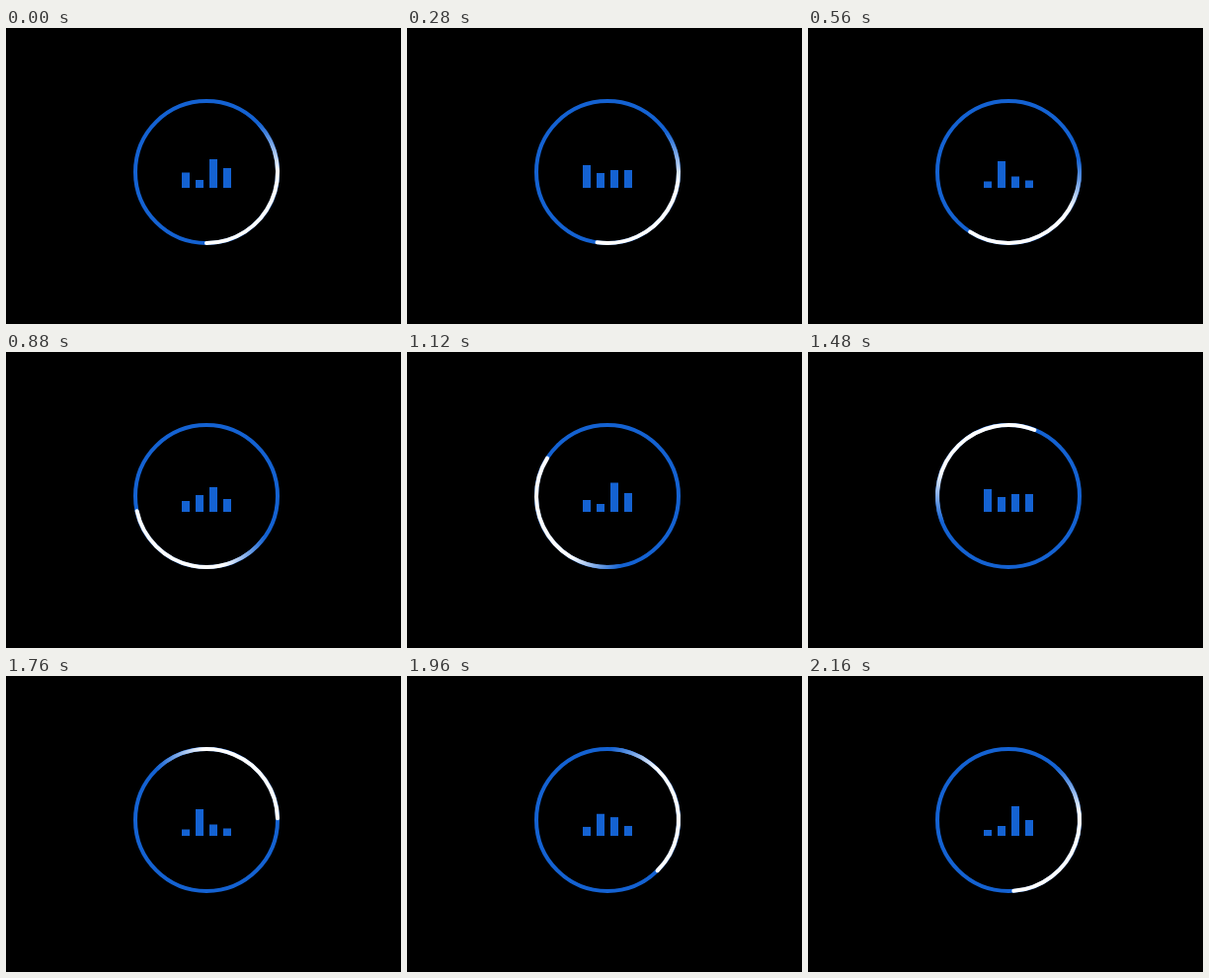
An HTML page for the animation above (2.2 s loop, 400 by 300 pixels).

```html
<!DOCTYPE html>
<html lang="en">
<head>
<meta charset="utf-8">
<title>Loader</title>
<style>
  html, body { margin: 0; height: 100%; overflow: hidden; background: #000; }
  svg { display: block; width: 400px; height: 300px; }
</style>
</head>
<body>
<svg viewBox="0 0 400 300">
  <defs>
    <linearGradient id="fade" gradientUnits="userSpaceOnUse" x1="0" y1="97" x2="0" y2="144">
      <stop offset="0" stop-color="#1462d2"/>
      <stop offset="1" stop-color="#fff"/>
    </linearGradient>
  </defs>
  <g fill="none" stroke-width="4">
    <circle cx="203" cy="146" r="72" stroke="#1462d2"/>
    <path id="sweep" d="M256.5 97.8A72 72 0 0 1 203 218" stroke="url(#fade)" stroke-linecap="round"/>
  </g>
  <g id="bars" fill="#1462d2">
    <rect x="178" width="8"/>
    <rect x="192" width="8"/>
    <rect x="206" width="8"/>
    <rect x="220" width="8"/>
  </g>
</svg>
<script>
const LOOP = 2200, STEP = 40, TURN = 2185, BEAT = 1200, BASE = 162;
const sweep = document.getElementById('sweep');
const bars = [...document.getElementById('bars').children];

const times = [0, 280, 560, 880, 960, 1120];
const heights = [
  [15.5, 23, 6.5, 11, 6, 12],
  [8, 15, 27, 17, 10, 8],
  [29, 18, 11.5, 25, 30, 29.5],
  [20, 18, 7.5, 13, 16, 19]
];

// Cubic Bezier easing, solved for x by bisection
function ease(x) {
  const at = (s, a, b) => 3 * (1 - s) ** 2 * s * a + 3 * (1 - s) * s * s * b + s ** 3;
  let lo = 0, hi = 1;
  for (let i = 0; i < 30; i++) {
    const mid = (lo + hi) / 2;
    if (at(mid, 0.42, 0.77) < x) lo = mid; else hi = mid;
  }
  return at(lo, 0, 0.77);
}

// Smooth periodic curve through the key heights
function heightAt(keys, t) {
  const n = times.length;
  const wrap = i => (i + n) % n;
  const time = i => times[wrap(i)] + Math.floor(i / n) * BEAT;
  const key = i => keys[wrap(i)];
  const slope = i => (key(i + 1) - key(i - 1)) / (time(i + 1) - time(i - 1));
  let i = n - 1;
  while (times[i] > t) i--;
  const span = time(i + 1) - time(i), u = (t - time(i)) / span, v = 1 - u;
  return v * v * (1 + 2 * u) * key(i) + u * u * (1 + 2 * v) * key(i + 1)
    + span * u * v * (v * slope(i) - u * slope(i + 1));
}

function draw(now) {
  const t = Math.floor((now % LOOP) / STEP) * STEP;
  sweep.setAttribute('transform', `rotate(${360 * ease(t / TURN)} 203 146)`);
  bars.forEach((bar, i) => {
    const h = heightAt(heights[i], t % BEAT);
    bar.setAttribute('y', BASE - h);
    bar.setAttribute('height', h);
  });
}

const start = performance.now();
function tick() {
  draw(performance.now() - start);
  requestAnimationFrame(tick);
}
tick();
</script>
</body>
</html>
```
